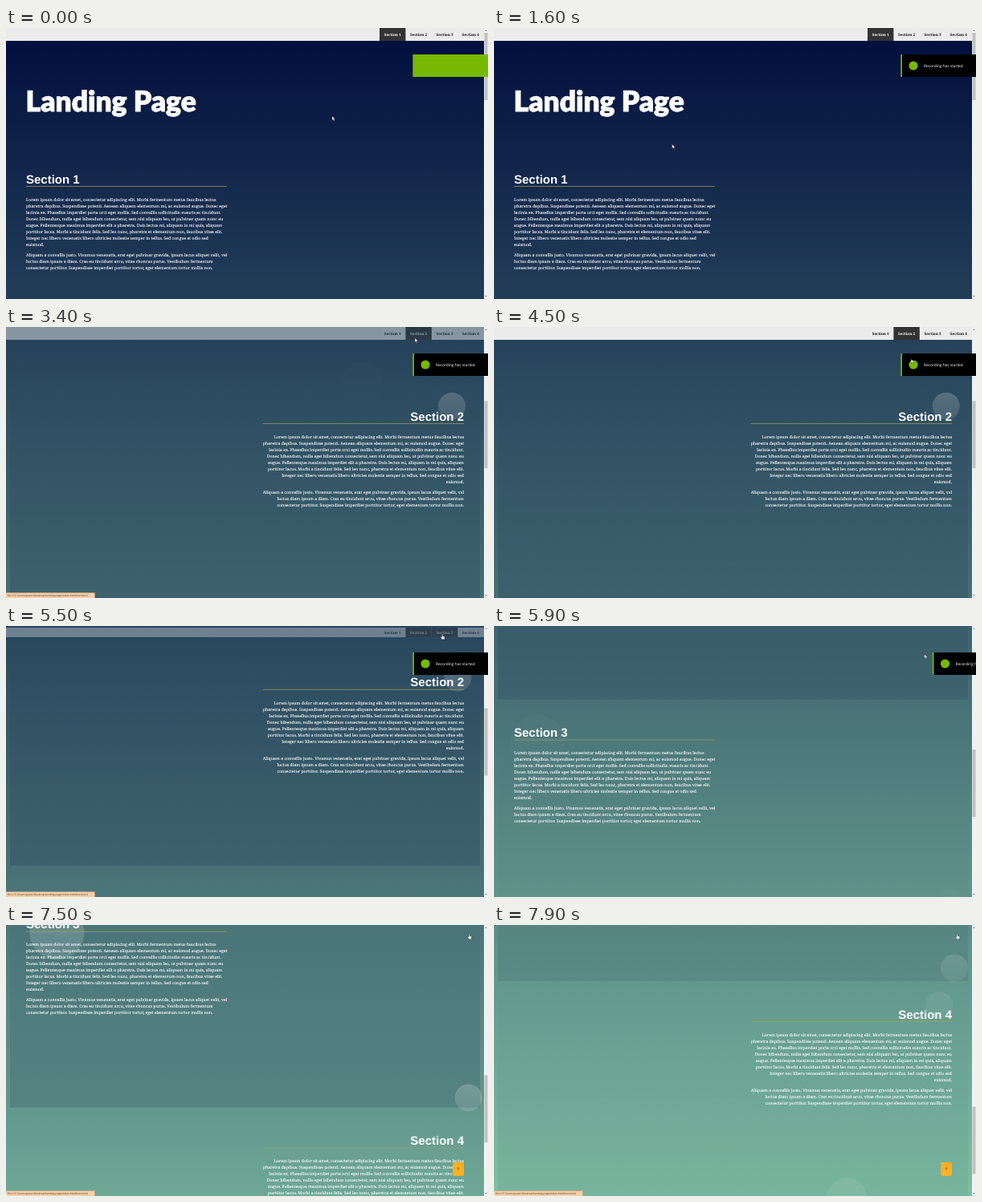
An HTML page that plays this animation: 600x338 px, repeating every 8000 ms.

```html
<!DOCTYPE html>
<html lang="en">
<head>
<meta charset="utf-8">
<title>Landing page scroll</title>
<style>
  html, body { margin: 0; width: 100%; height: 100%; overflow: hidden; background: #000d3c; }
  svg { display: block; width: 100vw; height: 100vh; }
  text { text-rendering: geometricPrecision; white-space: pre; }
  .h1 { font: 900 35.4px Lato, sans-serif; fill: #fff; stroke: #fff; stroke-width: .9; }
  .h2 { font: bold 15px "Liberation Sans", Arial, sans-serif; fill: #fff; }
  .body { font: 5.16px "Noto Serif", serif; fill: #fff; stroke: #fff; stroke-width: .1; }
  .nav { font: bold 4.65px "Noto Serif", serif; text-anchor: middle; }
  .ui { font-family: "Open Sans", sans-serif; }
</style>
</head>
<body>
<svg id="stage" viewBox="0 0 600 338" preserveAspectRatio="none">
  <defs>
    <linearGradient id="sky" x1="0" y1="0" x2="0" y2="1">
      <stop offset="0" stop-color="#000d3c"/><stop offset="1" stop-color="#88cbab"/>
    </linearGradient>
    <linearGradient id="shade" x1="0" y1="0" x2="0" y2="1">
      <stop offset="0" stop-color="#000d3c" stop-opacity="0"/><stop offset="1" stop-color="#000d3c" stop-opacity=".15"/>
    </linearGradient>
    <linearGradient id="bubble" x1="0" y1="0" x2="0" y2="1">
      <stop offset="0" stop-color="#fff" stop-opacity=".2"/><stop offset="1" stop-color="#fff" stop-opacity=".12"/>
    </linearGradient>
  </defs>
  <g id="page"></g>
  <g id="topButton">
    <rect x="556" y="296" width="14" height="17" rx="2.2" fill="#fcb023"/>
    <path d="M563 306v-3.4m-1.1 1.2l1.1-1.2 1.1 1.2" fill="none" stroke="#5a4210" stroke-width=".6"/>
  </g>
  <g id="nav"></g>
  <g id="scrollbar">
    <rect x="595" width="5" height="338" fill="#f1f1f1"/>
    <path d="M596.3 3.8l1.2-1.4 1.2 1.4zM596.3 334.2l1.2 1.4 1.2-1.4z" fill="#555"/>
    <rect id="thumb" x="595.5" width="4" height="84" fill="#c1c1c1"/>
  </g>
  <g id="toast">
    <rect x="506.3" y="33" width="94" height="28" fill="#76b900"/>
    <rect id="toastBlack" x="508" y="33" width="92" height="28" fill="#000"/>
    <g id="toastLabel">
      <circle cx="522" cy="47" r="5.6" fill="#76b900"/>
      <text class="ui" x="535" y="49" font-size="4.8" fill="#fff">Recording has started</text>
    </g>
  </g>
  <g id="status">
    <rect x="-.3" y="331.3" width="111" height="7" fill="#f8cfa8" stroke="#a08a78" stroke-width=".5"/>
    <text id="statusText" class="ui" x="1.5" y="336.2" font-size="3.35" fill="#4a3c32"></text>
  </g>
  <g id="cursor">
    <path id="arrow" d="M0 0v5.2l1.2-1.1.9 2 .9-.4-.9-1.9h1.7z" fill="#fff" stroke="#111" stroke-width=".35"/>
    <path id="hand" d="M-.5 .4q.6-.8 1.1 0v2.2l2.2.6q.5.2.4.9l-.5 2.6h-2.9l-1.9-2.6q.1-.9 1-.3l.6.5z" fill="#fff" stroke="#111" stroke-width=".35"/>
  </g>
</svg>
<script>
const LOOP = 8000, PAGE_H = 1311, SECTION_H = 270, FIRST_TOP = 147;
const SCROLL_MS = 690, HIDE_MS = 265, FADE_MS = 500;
const scrolls = [
  { start: 2472, from: 0, to: 347 },
  { start: 5331, from: 347, to: 617 },
  { start: 7195, from: 617, to: 887 }
];
// when each section lights up; the first one only once scrolling begins
const activeFrom = [2600, 2970, 5800, 7690];
const cursorPath = [
  [0, 406, 110], [300, 406, 110], [1500, 221.7, 145], [1850, 221.7, 145], [2350, 516, 7.5],
  [2900, 516, 7.5], [3350, 509, 13.8], [3600, 509, 13.8], [4100, 512, 40], [4600, 520, 40],
  [5050, 543, 10], [5750, 543, 10], [6500, 474.5, 249.5], [6750, 474.5, 249.5],
  [7150, 576.5, 11], [8000, 576.5, 11]
];
const paragraphs = [[
  "Lorem ipsum dolor sit amet, consectetur adipiscing elit. Morbi fermentum metus faucibus lectus",
  "pharetra dapibus. Suspendisse potenti. Aenean aliquam elementum mi, ac euismod augue. Donec eget",
  "lacinia ex. Phasellus imperdiet porta orci eget mollis. Sed convallis sollicitudin mauris ac tincidunt.",
  "Donec bibendum, nulla eget bibendum consectetur, sem nisi aliquam leo, ut pulvinar quam nunc eu",
  "augue. Pellentesque maximus imperdiet elit a pharetra. Duis lectus mi, aliquam in mi quis, aliquam",
  "porttitor lacus. Morbi a tincidunt felis. Sed leo nunc, pharetra et elementum non, faucibus vitae elit.",
  "Integer nec libero venenatis libero ultricies molestie semper in tellus. Sed congue et odio sed",
  "euismod."
], [
  "Aliquam a convallis justo. Vivamus venenatis, erat eget pulvinar gravida, ipsum lacus aliquet velit, vel",
  "luctus diam ipsum a diam. Cras eu tincidunt arcu, vitae rhoncus purus. Vestibulum fermentum",
  "consectetur porttitor. Suspendisse imperdiet porttitor tortor, eget elementum tortor mollis non."
]];
// section, centre, radius, period in seconds (negative turns backwards)
const bubbles = [
  [0, 59, 201, 34, 4], [0, 444, 416, 25, -5], [1, 559, 449, 17, 4], [2, 59, 741, 34, 4],
  [2, 573, 940.5, 17, -5], [3, 559, 989, 17, 4], [3, 444, 1226, 25, -5]
];

const $ = id => document.getElementById(id);
const clamp = v => Math.min(1, Math.max(0, v));
const ramp = (t, start, ms) => clamp((t - start) / ms);
const smooth = u => u * u * (3 - 2 * u);
const show = (node, on) => node.setAttribute("visibility", on ? "visible" : "hidden");

function add(parent, tag, attrs, text) {
  const node = document.createElementNS("http://www.w3.org/2000/svg", tag);
  for (const key in attrs) node.setAttribute(key, attrs[key]);
  if (text) node.textContent = text;
  parent.appendChild(node);
  return node;
}

const page = $("page"), nav = $("nav");
add(page, "rect", { width: 595, height: PAGE_H, fill: "url(#sky)" });
const panels = [0, 1, 2, 3].map(i => add(page, "rect",
  { x: 5, y: FIRST_TOP + i * SECTION_H, width: 585, height: SECTION_H, fill: "url(#shade)" }));
const bubbleNodes = bubbles.map(([, , , r]) => add(page, "circle", { r, fill: "url(#bubble)" }));
add(page, "text", { class: "h1", x: 24.6, y: 104 }, "Landing Page");

function addSection(i) {
  const top = FIRST_TOP + i * SECTION_H, right = i % 2;
  const at = { x: right ? 570 : 25, "text-anchor": right ? "end" : "start" };
  add(page, "text", { ...at, class: "h2", y: top + 46.5 }, `Section ${i + 1}`);
  add(page, "rect", { x: right ? 320 : 25, y: top + 50, width: 250, height: .8, fill: "#a3a74c", opacity: .85 });
  paragraphs.forEach((lines, p) => lines.forEach((line, n) =>
    add(page, "text", { ...at, class: "body", y: top + 68.7 + p * 68.9 + n * 8 }, line)));
}
[0, 1, 2, 3].forEach(addSection);

const bar = add(nav, "rect", { width: 595, fill: "#ebebec" });
const items = [0, 1, 2, 3].map(i => {
  const x = 465 + i * 32.4;
  return {
    box: add(nav, "rect", { x, width: 32.4, fill: "#333" }),
    label: add(nav, "text", { class: "nav", x: x + 16.2, y: 10 }, `Section ${i + 1}`)
  };
});

function scrollAt(t) {
  return scrolls.reduce((y, s) => y + (s.to - s.from) * smooth(ramp(t, s.start, SCROLL_MS)), 0);
}

function cursorAt(t) {
  const i = cursorPath.findIndex(k => k[0] > t);
  const [t0, x0, y0] = cursorPath[i - 1], [t1, x1, y1] = cursorPath[i];
  const u = smooth((t - t0) / (t1 - t0));
  return [x0 + (x1 - x0) * u, y0 + (y1 - y0) * u];
}

const activeUntil = section => activeFrom[section + 1] ?? Infinity;

function glow(t, section) {
  return smooth(ramp(t, activeFrom[section], FADE_MS)) * (1 - smooth(ramp(t, activeUntil(section), FADE_MS)));
}

function drawNav(t, active, hover) {
  const last = scrolls.filter(s => t >= s.start).pop();
  let alpha = 1, inset = 0;
  if (last) {
    const back = ramp(t, last.start + 730, 400);
    alpha = back || 1 - ramp(t, last.start, HIDE_MS);
    inset = back ? 0 : 3.2 * (1 - alpha);
  }
  nav.setAttribute("opacity", alpha);
  for (const rect of [bar, ...items.map(item => item.box)]) {
    rect.setAttribute("y", inset);
    rect.setAttribute("height", 16 - 2 * inset);
  }
  items.forEach(({ box, label }, i) => {
    const lit = i === active || i === hover;
    show(box, lit);
    label.setAttribute("fill", lit ? "#fff" : "#111");
  });
}

function drawBubbles(t) {
  bubbles.forEach(([section, cx, cy, , period], i) => {
    const on = activeFrom[section];
    const angle = (t - on) / 1000 / period * 2 * Math.PI;
    const reach = t >= on && t < activeUntil(section) ? 5 : 0;
    const node = bubbleNodes[i];
    node.setAttribute("cx", cx - reach * Math.cos(angle));
    node.setAttribute("cy", cy - reach * Math.sin(angle));
    node.setAttribute("opacity", glow(t, section));
  });
}

function drawToast(t) {
  const cover = smooth(ramp(t, 150, 400)), leave = smooth(ramp(t, 5700, 450));
  $("toast").setAttribute("transform", `translate(${94 * leave} 0)`);
  $("toastBlack").setAttribute("transform", `translate(${92 * (1 - cover)} 0)`);
  $("toastLabel").setAttribute("opacity", ramp(t, 650, 450));
}

function draw(t) {
  const y = scrollAt(t), [cx, cy] = cursorAt(t);
  const active = Math.max(0, activeFrom.filter(on => t >= on).length - 1);
  const hover = cy < 16 && cx >= 465 && cx < 595 ? Math.floor((cx - 465) / 32.4) : -1;

  page.setAttribute("transform", `translate(0 ${-y})`);
  panels.forEach((panel, i) => panel.setAttribute("opacity", glow(t, i)));
  drawBubbles(t);
  drawNav(t, active, hover);
  drawToast(t);
  show($("topButton"), y > 700);
  $("thumb").setAttribute("y", 6 + y / PAGE_H * 326);

  show($("status"), hover >= 0);
  $("statusText").textContent = `file:///C:/Users/guest/Desktop/landing-page/index.html#section${hover + 1}`;
  const pointing = hover >= 0 && cy < 13;
  $("cursor").setAttribute("transform", `translate(${cx} ${cy})`);
  show($("hand"), pointing);
  show($("arrow"), !pointing);
}

const began = performance.now();
function tick() {
  draw((performance.now() - began) % LOOP);
  requestAnimationFrame(tick);
}
tick();
</script>
</body>
</html>
```
